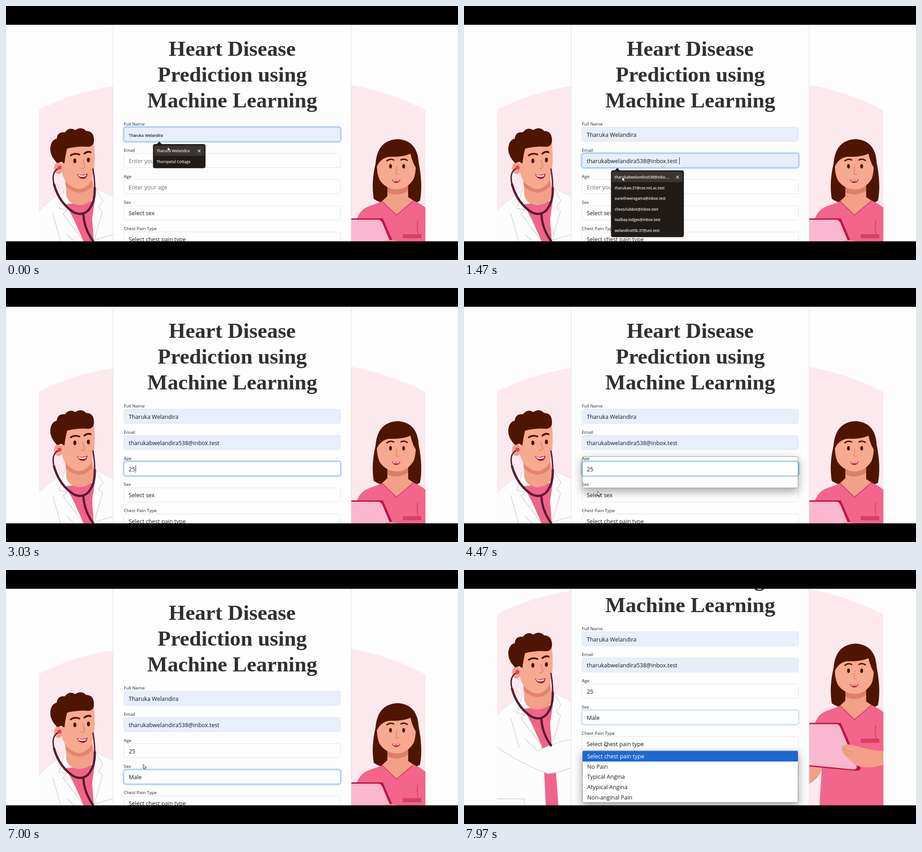
Recreate the animation shown at these times as an HTML page. Size 998 px wide and 561 px high, loop 8 s.

```html
<!DOCTYPE html>
<html lang="en">
<head>
<meta charset="utf-8">
<title>Heart Disease Prediction</title>
<style>
html, body { margin: 0; width: 100%; height: 100%; overflow: hidden; background: #000; }
svg, #list { position: absolute; left: 0; top: 0; }
text, #list { font-family: "Open Sans", "Noto Sans", sans-serif; font-size: 12.5px; fill: #15181b; color: #15181b; }
.title { font: bold 47.4px "Liberation Serif", Times, serif; text-anchor: middle; fill: #303030; }
.label { font-size: 9.85px; fill: #26292c; }
.hint { fill: #6a7076; }
.preview { font: 9px "Liberation Sans", Arial, sans-serif; fill: #000; }
.dark { font-size: 8px; font-weight: 600; fill: #eee9e5; }
#list { left: 260.5px; width: 475.5px; box-sizing: content-box; border: 1px solid #969ca6; border-radius: 3px;
  box-shadow: 0 7px 20px rgba(0,0,0,.36); overflow: hidden; }
#list div { height: 22.7px; line-height: 24px; padding-left: 10.5px; background: #fff; }
#list .on { background: #1f68d0; color: #fff; }
</style>
</head>
<body>
<svg width="998" height="561" viewBox="0 0 998 561">
  <defs>
    <clipPath id="left"><path d="M73 0H237V700H73Z"/></clipPath>
    <clipPath id="right"><path d="M762 0H926V700H762Z"/></clipPath>
  </defs>
  <rect y="41" width="998" height="479" fill="#fdfdfd"/>
  <g id="page">
    <g clip-path="url(#left)" fill="none" stroke-linecap="round" stroke-linejoin="round">
      <path fill="#fce9ee" d="M73 229Q150 190 237 177V700H73Z"/>
      <path fill="#fcfcfc" stroke="#dedede" d="M66 460Q88 434 128 408L140 398L199 403L242 424V700H66Z"/>
      <path fill="#ef6488" d="M132 438L196 430L190 470L194 520L203 576L209 660H181L177 576L171 519L150 472Z"/>
      <path fill="#f2a087" d="M131 372L133 405Q129 436 162 440Q195 437 196 408L190 380Z"/>
      <path fill="#e0866e" d="M131 385Q145 404 164 404Q180 402 189 385L190 398Q176 414 158 412Q140 408 132 398Z"/>
      <ellipse cx="116" cy="358" rx="10" ry="13" fill="#f2a087"/>
      <path fill="#f7aa8f" d="M122 303H194Q199 350 190 380Q178 405 158 404Q131 396 124 370Z"/>
      <path fill="#4f1503" d="M113 347Q96 330 98 312Q100 296 112 293Q114 277 130 279Q140 266 153 274Q167 265 177 276Q192 276 194 292Q196 309 183 311Q158 309 135 315Q131 330 129 348L122 344Z"/>
      <g stroke="#4f1503" stroke-width="3.8"><path d="M143 330Q151 324 162 328M173 326Q180 320 187 323"/></g>
      <g fill="#451305"><ellipse cx="152" cy="342" rx="3.4" ry="5.2"/><ellipse cx="182" cy="340" rx="3.4" ry="5.2"/></g>
      <path stroke="#dc806b" stroke-width="1.6" d="M170 340L174 355Q172 360 166 358"/>
      <path fill="#b4153b" d="M157 371Q169 376 180 370Q179 382 169 382Q160 381 157 371Z"/>
      <path fill="#fff" d="M159 372Q169 377 178 372L176 376Q168 379 161 376Z"/>
      <g stroke="#cfcfd2" stroke-width="1.3">
        <path d="M128 408L117 447L134 450L126 459L171 519L177 576M199 404L214 430L204 445L213 453L194 520M103 458L122 524M135 505L160 528M73 637H133V700"/>
      </g>
      <path fill="#fcfcfc" stroke="#cfcfd2" stroke-width="1.3" d="M160 532Q190 516 242 504V566Q205 581 185 581Q130 562 73 523"/>
      <g stroke="#581c33">
        <path stroke-width="3" d="M117 358Q99 366 106 394M192 360Q196 382 196 404"/>
        <path stroke-width="5" d="M106 394Q118 436 150 456Q168 464 181 452Q197 434 196 402M171 461Q172 490 192 519"/>
      </g>
      <circle cx="118" cy="357" r="4.5" fill="#e33d69"/>
    </g>
    <g clip-path="url(#right)" fill="none" stroke-linecap="round" stroke-linejoin="round">
      <path fill="#fce9ee" d="M762 174Q850 190 926 230V700H762Z"/>
      <path fill="#4f1503" d="M812 426Q806 390 816 348Q820 296 865 294Q908 297 911 345Q921 395 914 430Q890 446 862 441Q830 438 812 426Z"/>
      <path fill="#f2668b" d="M772 480Q778 450 802 442L838 429L862 440L893 427Q912 434 930 448V700H782L790 570L762 548Z"/>
      <path fill="#f2a087" d="M842 388V420Q834 428 830 431L862 461L900 430L888 422V388Z"/>
      <path fill="#dc806a" d="M842 396Q862 412 888 396V408Q866 422 842 412Z"/>
      <path fill="#f7aa8f" d="M819 346Q820 320 864 311Q902 320 905 347Q905 370 900 382Q886 405 862 405Q838 404 825 384Q818 370 819 346Z"/>
      <path fill="#4f1503" d="M816 362Q816 304 866 299Q908 302 910 364Q898 350 893 326Q878 334 846 333Q824 336 816 362Z"/>
      <path stroke="#4f1503" stroke-width="3" d="M841 342Q848 336 856 340M872 340Q879 336 886 341"/>
      <g fill="#451305"><ellipse cx="849" cy="354" rx="3.2" ry="5"/><ellipse cx="878" cy="354" rx="3.2" ry="5"/></g>
      <path stroke="#dc806b" stroke-width="1.6" d="M863 355L861 370Q863 373 867 371"/>
      <path fill="#c3203f" d="M852 383Q862 387 871 383Q869 391 861 391Q854 390 852 383Z"/>
      <path fill="#fff" d="M854 384Q862 388 869 384L867 387H856Z"/>
      <path stroke="#d64270" stroke-width="2" d="M830 431L862 462L900 430M784 484Q792 520 786 560M909 475Q906 495 912 510"/>
      <path fill="#d93d69" d="M876 504H917V513H876Z"/>
      <path fill="#f2a087" d="M762 545L792 562Q788 590 762 604Z"/>
      <path fill="#c0134d" d="M756 469H832L876 570Q874 575 866 575L756 565Z"/>
      <path fill="#f9b8cf" d="M756 472H823Q828 473 831 479L867 565Q868 572 860 572L756 562Z"/>
      <path fill="#f2a087" d="M930 532Q896 530 858 518Q838 514 834 522Q832 534 846 546L864 562Q890 574 930 560Z"/>
      <path stroke="#dc806b" stroke-width="1.3" d="M838 527L858 534M840 536L857 543"/>
    </g>
    <rect x="236.5" y="30" width="525.5" height="680" fill="#fdfdfd" stroke="#dcdfe3"/>
    <text class="title" x="499.5" y="110.3">Heart Disease</text>
    <text class="title" x="499.5" y="167.3">Prediction using</text>
    <text class="title" x="499.5" y="224.3">Machine Learning</text>
    <g id="form"></g>
  </g>
</svg>
<div id="list"></div>
<svg width="998" height="561" viewBox="0 0 998 561">
  <g id="over"></g>
  <path d="M0 0H998V41.5H0ZM0 519.7H998V561H0Z"/>
</svg>
<script>
const LOOP = 8000, STEP = 57.8, ROW = 22.7;
const NAME = 'Tharuka Welandira', MAIL = 'tharukabwelandira538@inbox.test';
const MAILS = ['tharukabwelandira538@inbo....', 'tharukaw.37@cse.nvt.ac.test', 'sunethweragama@inbox.test',
  'chessclubbot@inbox.test', 'tealbay.lodges@inbox.test', 'welandirathb.37@uni.test'];
const LABELS = ['Full Name', 'Email', 'Age', 'Sex', 'Chest Pain Type', 'Resting Blood Pressure', 'Cholesterol'];
const SEX = ['Select sex', 'Male', 'Female'];
const PAIN = ['Select chest pain type', 'No Pain', 'Typical Angina', 'Atypical Angina', 'Non-anginal Pain'];
// focus start and end per field
const FOCUS = [[-500, 1000], [1000, 1880], [1880, 4490], [4490, 7890]];
// time, x, y of the pointer
const TRACK = [[0, 357, 311], [670, 357, 311], [950, 352, 341], [1100, 352, 341], [1300, 349, 377], [1560, 349, 377],
  [1950, 304, 404], [4070, 304, 404], [4400, 295, 449], [5100, 295, 449], [5600, 308, 459], [6050, 308, 459],
  [6450, 300, 407], [6780, 300, 407], [7000, 303, 429], [7300, 308, 460], [7500, 308, 460], [7780, 311, 379], [8000, 311, 379]];

const $ = id => document.getElementById(id);
const ramp = (t, a, b) => Math.min(1, Math.max(0, (t - a) / (b - a)));
const ease = p => p * p * (3 - 2 * p);
const within = (t, a, b) => t >= a && t < b;
const text = (x, y, s, cls = '') => `<text x="${x}" y="${y}" class="${cls}">${s}</text>`;

function pointerAt(t) {
  const i = TRACK.findIndex(k => k[0] > t), [a, b] = [TRACK[i - 1], TRACK[i]];
  const p = ease(ramp(t, a[0], b[0]));
  return [a[1] + (b[1] - a[1]) * p, a[2] + (b[2] - a[2]) * p];
}

// text and style class of every field
function values(t) {
  return [
    t < 230 ? [NAME, 'preview'] : [NAME],
    t < 1250 ? ['Enter your email', 'hint'] : t < 1450 ? [MAIL, 'preview'] : [MAIL],
    t < 2700 ? ['Enter your age', 'hint'] : [t < 2930 ? '2' : '25'],
    [t < 6750 ? SEX[0] : SEX[1]],
    [PAIN[0]],
    ['Enter resting blood pressure', 'hint'],
    ['Enter cholesterol', 'hint']
  ];
}

function form(t) {
  let out = values(t).map(([value, cls], i) => {
    const y = 268 + i * STEP, [on, off] = FOCUS[i] || [1e5, 1e5];
    const glow = ramp(t, on, on + 150) * (1 - ramp(t, off, off + 150));
    const fill = i == 0 || i == 1 && t >= 1250 ? '#e8effb' : '#fefefe';
    const box = `x="260.5" y="${y}" width="478" height="31" rx="4.5"`;
    return text(260, y - 4, LABELS[i], 'label') +
      `<rect ${box} fill="none" stroke="#c2dbfe" stroke-width="6" opacity="${glow}"/>` +
      `<rect ${box} fill="${fill}" stroke="#dee2e6"/>` +
      `<rect ${box} fill="none" stroke="#86b7fe" opacity="${glow}"/>` +
      text(271, y + 21, value, cls);
  }).join('');
  if (within(t, 1450, 1880)) out += '<path d="M475.5 334V350" stroke="#333"/>';
  if (within(t, 2700, 3700)) out += `<path d="M${t < 2930 ? 279 : 286}.5 392V408" stroke="#333"/>`;
  if (within(t, 1850, 2930)) out += '<path fill="#eee" d="M717 391H728V409H717Z"/><path fill="#444" d="M719.5 397L722.5 393.5L725.5 397ZM719.5 403L722.5 406.5L725.5 403Z"/>';
  return out;
}

function suggestions(y, w, items, hover) {
  const h = items.length * 23.6 + 6;
  return `<path fill="#211b17" d="M332 ${y + 1}L338.5 ${y - 5.5}L345 ${y + 1}Z"/>` +
    `<rect x="324.5" y="${y}" width="${w}" height="${h}" rx="4.5" fill="#211b17"/>` +
    (hover ? `<rect x="327" y="${y + 3}" width="${w - 5}" height="23" rx="3" fill="#3b3531"/>` : '') +
    items.map((s, i) => text(332.5, y + 18 + i * 23.6, s, 'dark')).join('') +
    `<path transform="translate(${324.5 + w - 14},${y + 15})" d="M-3 -3L3 3M3 -3L-3 3" stroke="#ddd" stroke-width="1.1"/>`;
}

function pointer(t, x, y) {
  if (within(t, 2700, 3870)) return '';
  const beam = within(t, 830, 1220) || within(t, 1840, 4200);
  return `<g transform="translate(${x},${y})">` + (beam
    ? '<path d="M-2.5 -4.5H2.5M0 -4.5V5M-2.5 5H2.5" stroke="#222" fill="none"/>'
    : '<path d="M0 0V10L2.3 8L4 11.5L5.6 10.7L4 7.4H7Z" fill="#fff" stroke="#222" stroke-width=".9"/>') + '</g>';
}

function showList(t, y) {
  const pain = t > 7880, again = within(t, 6080, 6750);
  const list = $('list'), open = pain || again || within(t, 4440, 5720);
  list.style.display = open ? 'block' : 'none';
  if (!open) return;
  const items = pain ? PAIN : SEX, top = pain ? 399 : 372;
  const start = pain ? 7880 : again ? 6080 : 4460;
  const row = Math.floor((y - top - 1) / ROW), hot = items[row] ? row : 0;
  const alpha = ramp(t, start + 15, start + 75);
  list.style.top = top + 'px';
  list.innerHTML = items.map((s, i) => `<div style="opacity:${alpha}" class="${i == hot ? 'on' : ''}">${s}</div>`).join('');
}

function draw(now) {
  const t = now % LOOP, [x, y] = pointerAt(t);
  $('page').setAttribute('transform', `translate(0,${-131.5 * ease(ramp(t, 7100, 7550))})`);
  $('form').innerHTML = form(t);
  showList(t, y);
  $('over').innerHTML =
    (t < 230 ? suggestions(305, 116, [NAME, 'Thornpetal Cottage'], true) : '') +
    (within(t, 1060, 1500) ? suggestions(363, 161, MAILS, t > 1250) : '') +
    pointer(t, x, y);
  requestAnimationFrame(draw);
}
requestAnimationFrame(draw);
</script>
</body>
</html>
```
